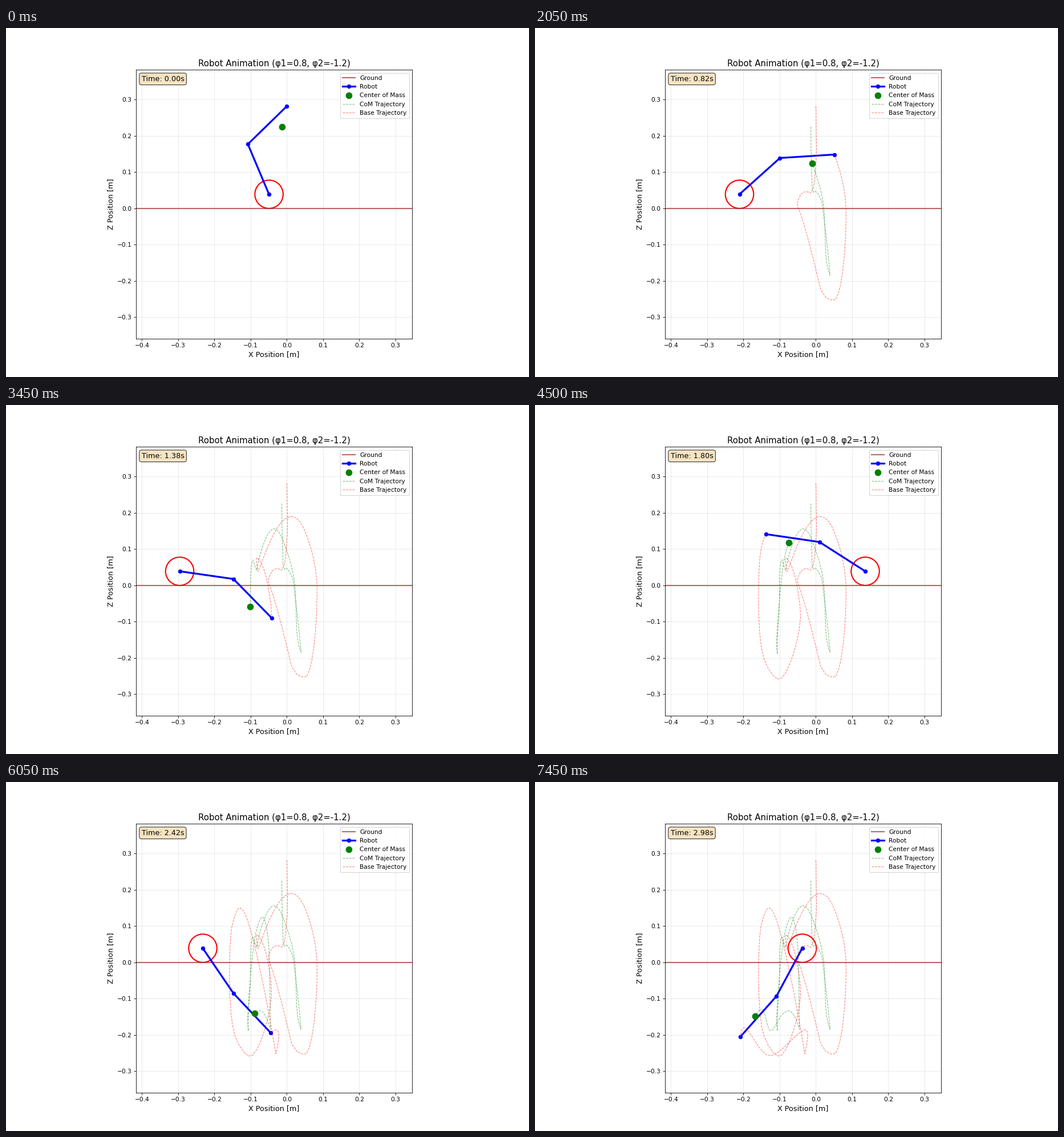
A matplotlib script for the animation above (7500 ms loop, 917 by 611 pixels).

```python
import numpy as np
import matplotlib.pyplot as plt
from matplotlib.animation import FuncAnimation

W, H, DPI = 917, 611, 76.4
FRAMES, INTERVAL, DT = 150, 50, 0.02
LINK, RADIUS = 0.15, 0.039
MASS = dict(base=0.757, knee=0.02, wheel=0.223)
SCALE, X0, Z0 = 634.9, 492.3, 315.8  # stage pixels per metre, world origin

# Phases between impacts; each key is (step, base x, base z, wheel x) on the stage.
PHASES = [
    [(0, 492.3, 136.9, 461.1), (6, 493, 179, 460), (9, 493, 231, 465),
     (11.5, 487, 291.5, 492)],
    [(15.5, 465, 293, 600), (17.3, 459, 309, 648.6)],
    [(20, 468, 332.5, 627.5), (26.3, 503, 467, 560)],
    [(28, 519.5, 476, 508), (29.2, 528, 475, 480)],
    [(31, 536, 448, 430), (36, 545, 311, 374), (41, 524.5, 221.5, 358.5),
     (45.7, 500, 195, 376), (54.8, 442, 294, 431)],
    [(59.8, 440, 267, 413), (66, 459, 315, 328), (69, 465.5, 372.5, 304.5),
     (73, 446, 455, 353), (75.5, 429, 480, 412), (79, 402, 446, 498),
     (86, 394, 269.5, 574), (90, 404.5, 226, 579), (104, 454, 370, 497),
     (109, 473, 476, 434)],
    [(118, 473, 433.5, 348.5), (121, 464, 439, 345), (132.5, 411, 479, 418),
     (144.5, 365.5, 430.5, 494.5), (149, 360, 446, 468.5)],
]
# Steps at which the knee swings through to the other side.
FLIPS = [11.5, 17.3, 75.5, 121.5]


def hermite(t, p, s):
    """Cubic Hermite curve through keys p at times t, sampled at s."""
    m = np.gradient(p, t, axis=0, edge_order=2)
    i = np.clip(np.searchsorted(t, s, side="right") - 1, 0, len(t) - 2)
    h = (t[i + 1] - t[i])[:, None]
    u = (s - t[i])[:, None] / h
    v = 1 - u
    return (v**2 * ((1 + 2 * u) * p[i] + u * h * m[i])
            + u**2 * ((1 + 2 * v) * p[i + 1] - v * h * m[i + 1]))


def solve_knee(wheel, base, side):
    leg = base - wheel
    d = np.hypot(leg[:, 0], leg[:, 1])
    bend = side * np.sqrt(np.maximum(LINK**2 - d**2 / 4, 0)) / d
    normal = np.column_stack([-leg[:, 1], leg[:, 0]])
    return (wheel + base) / 2 + bend[:, None] * normal


def sample_motion():
    steps = np.arange(FRAMES)
    pose = np.empty((FRAMES, 3))
    last = []
    for phase in PHASES:
        keys = np.array(last + phase, float)
        t = keys[:, 0]
        inside = (steps >= t[0]) & (steps <= t[-1])
        pose[inside] = hermite(t, keys[:, 1:], steps[inside])
        last = phase[-1:]
    base = np.column_stack([pose[:, 0] - X0, Z0 - pose[:, 1]]) / SCALE
    wheel = np.column_stack([(pose[:, 2] - X0) / SCALE, np.full(FRAMES, RADIUS)])
    side = (-1.0) ** np.searchsorted(FLIPS, steps)
    return base, solve_knee(wheel, base, side), wheel


base, knee, wheel = sample_motion()
com = MASS["base"] * base + MASS["knee"] * knee + MASS["wheel"] * wheel

fig, ax = plt.subplots(figsize=((W + 1e-6) / DPI, (H + 1e-6) / DPI), dpi=DPI)
ax.set_xlim(-0.4165, 0.346)
ax.set_ylim(-0.359, 0.382)
ax.set_aspect("equal")
ax.grid(True, alpha=0.3)
ax.set_xlabel("X Position [m]", fontsize=12)
ax.set_ylabel("Z Position [m]", fontsize=12)
ax.set_title("Robot Animation (φ1=0.8, φ2=-1.2)", fontsize=14)

ax.axhline(0, color="brown", lw=2, alpha=0.7, label="Ground")
robot, = ax.plot([], [], "bo-", lw=3, ms=6, label="Robot")
com_dot, = ax.plot([], [], "go", ms=10, label="Center of Mass")
com_path, = ax.plot([], [], "g--", lw=1, alpha=0.5, label="CoM Trajectory")
base_path, = ax.plot([], [], "r--", lw=1, alpha=0.5, label="Base Trajectory")
tyre = ax.add_patch(plt.Circle((0, RADIUS), RADIUS, fill=False, color="red", lw=2))
clock = ax.text(0.02, 0.98, "", transform=ax.transAxes, fontsize=12, va="top",
                bbox=dict(boxstyle="round", facecolor="wheat", alpha=0.8))
ax.legend(loc="upper right")


def update(i):
    robot.set_data(*np.array([wheel[i], knee[i], base[i]]).T)
    com_dot.set_data(*com[i:i + 1].T)
    com_path.set_data(*com[:i + 1].T)
    base_path.set_data(*base[:i + 1].T)
    tyre.center = tuple(wheel[i])
    clock.set_text(f"Time: {i * DT:.2f}s")
    return robot, com_dot, com_path, base_path, tyre, clock


anim = FuncAnimation(fig, update, frames=FRAMES, interval=INTERVAL,
                     repeat=True, repeat_delay=0, blit=False)
plt.show()
```
